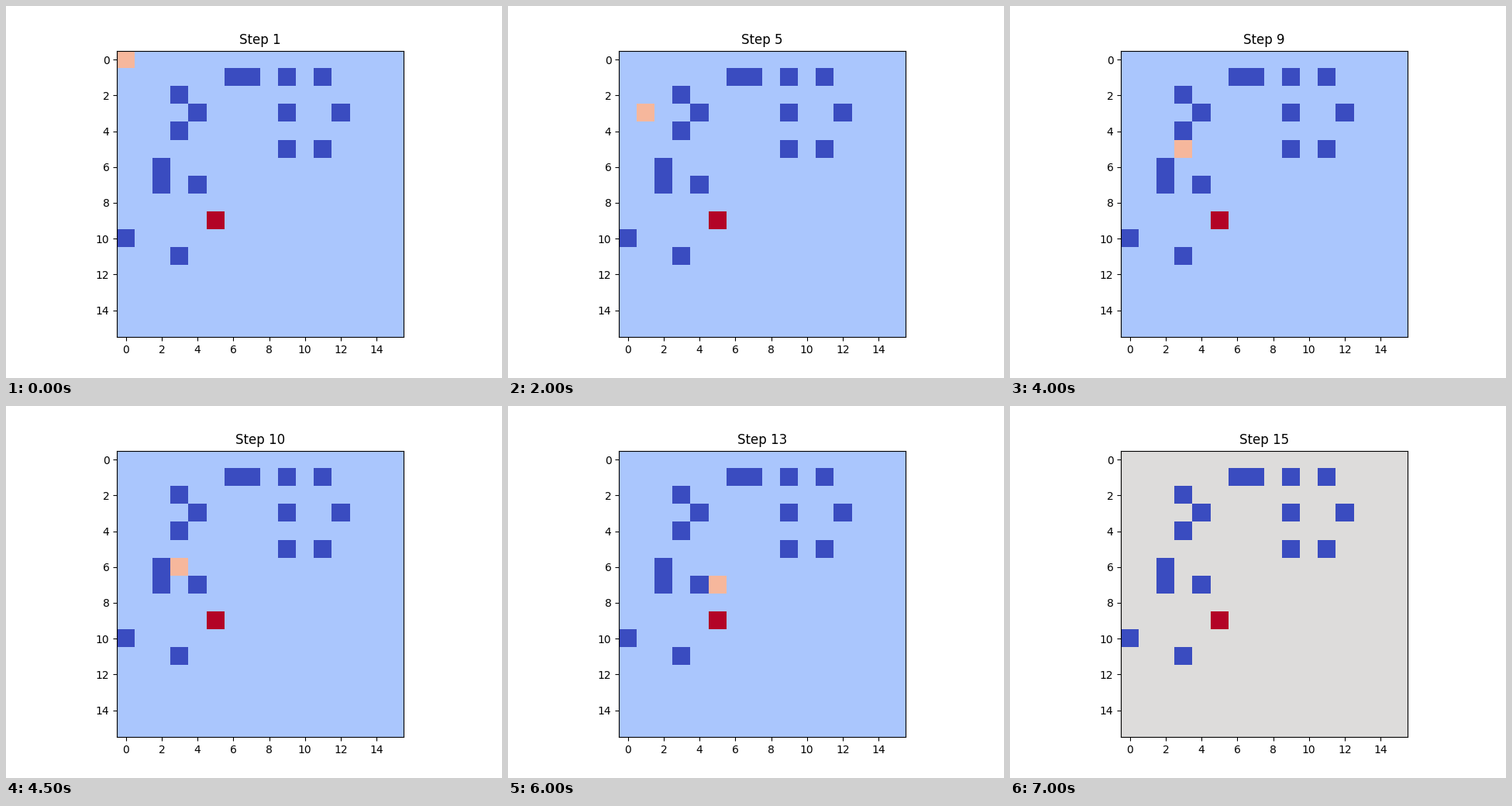
A matplotlib script that plays this animation: 640x480 px, repeating every 7500 ms.

```python
import matplotlib.pyplot as plt
import numpy as np
from matplotlib.animation import FuncAnimation

SIZE = 16
START, GOAL = (0, 0), (9, 5)
MOVES = "DDDRDDRRDRRDDD"
WALL, AGENT, TARGET = -1, 1, 2


def chevron(grid, row, col, step):
    """Three walls pointing right, with the tip at (row, col)."""
    for k in (-1, 0, 1):
        grid[row + k * step, col - abs(k)] = WALL


def build_room():
    room = np.zeros((SIZE, SIZE))
    chevron(room, 3, 4, step=1)
    chevron(room, 3, 12, step=2)
    room[1:6:2, 9] = WALL
    room[1, 6:8] = WALL
    room[6:8, 2] = WALL
    for cell in [(7, 4), (10, 0), (11, 3)]:
        room[cell] = WALL
    room[GOAL] = TARGET
    return room


def agent_at(i):
    done = MOVES[:i]
    return START[0] + done.count("D"), START[1] + done.count("R")


def grid_at(i):
    grid = room.copy()
    grid[agent_at(i)] = AGENT
    return grid


room = build_room()
fig, ax = plt.subplots(figsize=(6.4, 4.8), dpi=100)
image = ax.imshow(grid_at(0), cmap="coolwarm", interpolation="nearest")
title = ax.set_title("Step 1")


def update(i):
    image.set_data(grid_at(i))
    image.autoscale()  # the palette shifts once the agent covers the goal
    title.set_text(f"Step {i + 1}")
    return image, title


anim = FuncAnimation(fig, update, frames=len(MOVES) + 1, interval=500,
                     repeat=True, repeat_delay=0)
plt.show()
```
